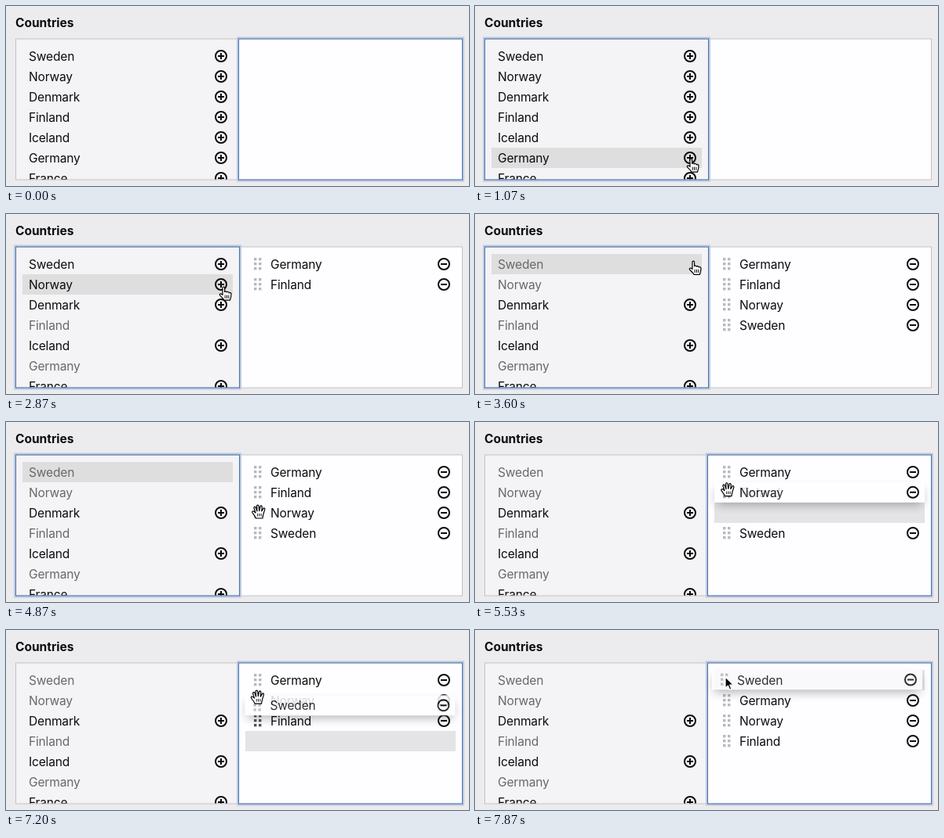
Animation, 590 px wide and 230 px high, one loop 8000 ms. Source, as an HTML page:

```html
<!DOCTYPE html>
<html lang="en">
<head>
<meta charset="utf-8">
<title>Country picker</title>
<style>
html, body { margin: 0; width: 100%; height: 100%; overflow: hidden; background: #ecebed; }
#stage {
  position: relative; width: 590px; height: 230px; overflow: hidden;
  font: 15.5px/27px Inter, Roboto, sans-serif; letter-spacing: -.15px; color: #0c0c0d;
}
h1 { position: absolute; left: 12px; top: 8px; margin: 0; font: inherit; font-weight: 700; letter-spacing: 0; }
.panel { position: absolute; top: 42px; width: 285px; height: 180px; box-sizing: border-box; overflow: hidden; }
#left { left: 12px; padding: 9px; background: #f4f3f5; }
#right { left: 297px; background: #fefdff; }
#frames { position: absolute; left: 0; top: 0; fill: none; stroke: #c3c2c6; }
.row { position: relative; width: 268px; height: 26px; box-sizing: border-box; padding-left: 8px; white-space: nowrap; }
.row svg { position: absolute; right: 6px; top: 4px; }
.row.active { background: #dfdedf; }
.row.used { color: #68676a; }
.row.used svg { display: none; }
.item { position: absolute; left: 305px; top: 51px; padding-left: 32px; z-index: 2; }
.item .grip { left: 10px; right: auto; fill: #b9b8bb; }
.item.hover .grip { fill: #555; }
.item.hole { background: #e4e3e5; z-index: 1; }
.item.hole > * { display: none; }
#card { z-index: 3; background: #fefdff; opacity: .84; box-shadow: 0 6px 13px -3px rgba(0, 0, 0, .36); }
.cursor {
  position: absolute; left: 0; top: 0; z-index: 4; overflow: visible;
  fill: #fff; stroke: #000; stroke-width: 1.2; stroke-linejoin: round; stroke-linecap: round;
}
</style>
</head>
<body>
<div id="stage">
  <h1>Countries</h1>
  <div id="left" class="panel"></div>
  <div id="right" class="panel"></div>
  <svg id="frames" width="590" height="230">
    <rect x="12.5" y="42" width="569" height="180"/>
    <g id="focus">
      <rect x="11" y="40.5" width="288" height="183" stroke="#bdc9e0" stroke-width="2"/>
      <rect x="12.5" y="42" width="285" height="180" stroke="#4470ae"/>
    </g>
  </svg>
  <svg class="cursor" width="18" height="20">
    <g id="pointer">
      <path d="M5 11.3V2.4C5 .5 7.6.5 7.6 2.4V7.5C8.2 6.4 10.2 6.6 10.4 8C11.2 7 13 7.4 13.2 8.8C14.2 8 16 8.6 16 10.4C16 13 15.8 14.5 14.4 18.2H7C6 16 3.5 13.8 1.6 11.9C.6 10.6 2.2 9.3 3.6 10.2Z"/>
      <path d="M8.2 12v3.4M10.5 12v3.4M12.8 12v3.4" stroke-width="1"/>
    </g>
    <g id="grab">
      <path d="M5.5 18C4.5 15.5 2.5 13 1 11C0 9.5 1.5 8.3 3 9.3L5 11L3 5C2.6 3.3 4.6 2.7 5.2 4.3L7 9L6.6 2.4C6.5.7 8.8.6 9 2.3L9.8 8.6L11 2.8C11.3 1.3 13.3 1.6 13.2 3.2L12.8 9L14.8 5.6C15.6 4.3 17.3 5.1 16.8 6.6L15.2 12C14.8 14 14 16 14 18Z"/>
      <path d="M7.6 12.3v2.8M9.9 12.3v2.8M12.2 12.3v2.8" stroke-width=".9"/>
    </g>
    <path id="arrow" fill="#000" stroke="#fff" d="M8 8V22.2L11.3 19.1L13.5 24.2L15.9 23.2L13.7 18.2H18.2Z"/>
  </svg>
</div>
<script>
// All times are in ticks
const FPS = 15, LOOP = 120, ROW = 26, GLIDE = 9;
const countries = ["Sweden", "Norway", "Denmark", "Finland", "Iceland", "Germany", "France"];

// Tick of each mouse press; the country is added one tick later
const presses = { Germany: 16, Finland: 29, Norway: 43, Sweden: 53 };
const picked = Object.keys(presses);

// lift and dx: how far the card travels; hops: when the hole jumps to a slot
const drags = [
  { name: "Norway", grab: 76, drop: 91, lift: 30, dx: 0, hops: [{ at: 86, slot: 1 }] },
  { name: "Sweden", grab: 103, drop: LOOP, lift: 78.5, dx: -3, hops: [{ at: 109, slot: 1 }, { at: 116, slot: 0 }] }
];
const ARROW_AT = 118;

// Cursor glides: start tick, x, y. While dragging it runs a little ahead of the card.
const glides = [
  [5, 269, 194], [20, 269, 143], [33, 271, 92], [46, 272, 58],
  [63, 313, 105], [75.3, 313, 75], [90, 313, 131], [102.3, 311, 52]
];

const $ = id => document.getElementById(id);
const stage = $("stage");
const cursor = document.querySelector(".cursor");

const icon = bar => `<svg width="18" height="18" fill="none" stroke="#0c0c0d" stroke-width="2">
  <circle cx="9" cy="9" r="7"/><path d="${bar}"/></svg>`;
const plus = icon("M5 9h8M9 5v8"), minus = icon("M5 9h8");
const dots = Array.from({ length: 6 }, (_, i) =>
  `<rect x="${1 + i % 2 * 6}" y="${1 + (i >> 1) * 6}" width="3.4" height="3.4"/>`).join("");
const grip = `<svg class="grip" width="12" height="18">${dots}</svg>`;

function addRow(parent, cls, html) {
  const el = document.createElement("div");
  el.className = "row " + cls;
  el.innerHTML = html;
  return parent.appendChild(el);
}

const addItem = name => addRow(stage, "item", `${grip}<span>${name}</span>${minus}`);
const rows = countries.map(name => addRow($("left"), "", `<span>${name}</span>${plus}`));
const items = picked.map(addItem);
const card = addItem("");
card.id = "card";

const move = (el, x, y) => { el.style.transform = `translate(${x}px, ${y}px)`; };
const show = (el, on) => { el.style.display = on ? "" : "none"; };

function glide(tick, from) {
  const p = Math.min(1, Math.max(0, (tick - from) / GLIDE));
  return p * p * (3 - 2 * p);
}

function cursorAt(tick) {
  return glides.reduce(([x, y], [from, toX, toY]) => {
    const e = glide(tick, from);
    return [x + (toX - x) * e, y + (toY - y) * e];
  }, [272, 232]);
}

function cursorShape(tick, x) {
  if (tick >= ARROW_AT) return "arrow";
  if (x > 307) return "grab";
  return x > 283 ? "arrow" : "pointer";
}

function orderAt(tick) {
  const order = [...picked];
  for (const { name, hops } of drags) {
    for (const { at, slot } of hops) {
      if (tick < at) continue;
      order.splice(order.indexOf(name), 1);
      order.splice(slot, 0, name);
    }
  }
  return order;
}

function renderLeft(tick) {
  const focused = tick >= presses.Germany && tick < drags[0].grab;
  move($("focus"), focused ? 0 : 284, 0);
  const active = focused && picked.filter(name => tick >= presses[name]).pop();
  rows.forEach((row, i) => {
    row.classList.toggle("active", countries[i] === active);
    row.classList.toggle("used", tick > presses[countries[i]]);
  });
}

function renderRight(tick) {
  const order = orderAt(tick);
  const drag = drags.find(d => tick >= d.grab && tick < d.drop);
  let below = -1;
  show(card, drag);
  if (drag) {
    const e = glide(tick, drag.grab);
    const y = orderAt(drag.grab).indexOf(drag.name) * ROW - drag.lift * e;
    card.querySelector("span").textContent = drag.name;
    move(card, drag.dx * e ** 3, y);
    below = Math.ceil(y / ROW);
  }
  items.forEach((item, i) => {
    const slot = order.indexOf(picked[i]);
    show(item, tick > presses[picked[i]]);
    move(item, 0, slot * ROW);
    item.classList.toggle("hole", !!drag && drag.name === picked[i]);
    item.classList.toggle("hover", slot === below);
  });
}

function renderCursor(tick) {
  const [x, y] = cursorAt(tick);
  const shape = cursorShape(tick, x);
  for (const id of ["pointer", "grab", "arrow"]) show($(id), id === shape);
  move(cursor, x, y);
}

const start = performance.now();
function frame() {
  // A few ms of slack keeps rounded times on the right tick
  const t = performance.now() - start + 5;
  const tick = Math.floor(t * FPS / 1000) % LOOP;
  renderLeft(tick);
  renderRight(tick);
  renderCursor(tick);
  requestAnimationFrame(frame);
}
frame();
</script>
</body>
</html>
```
